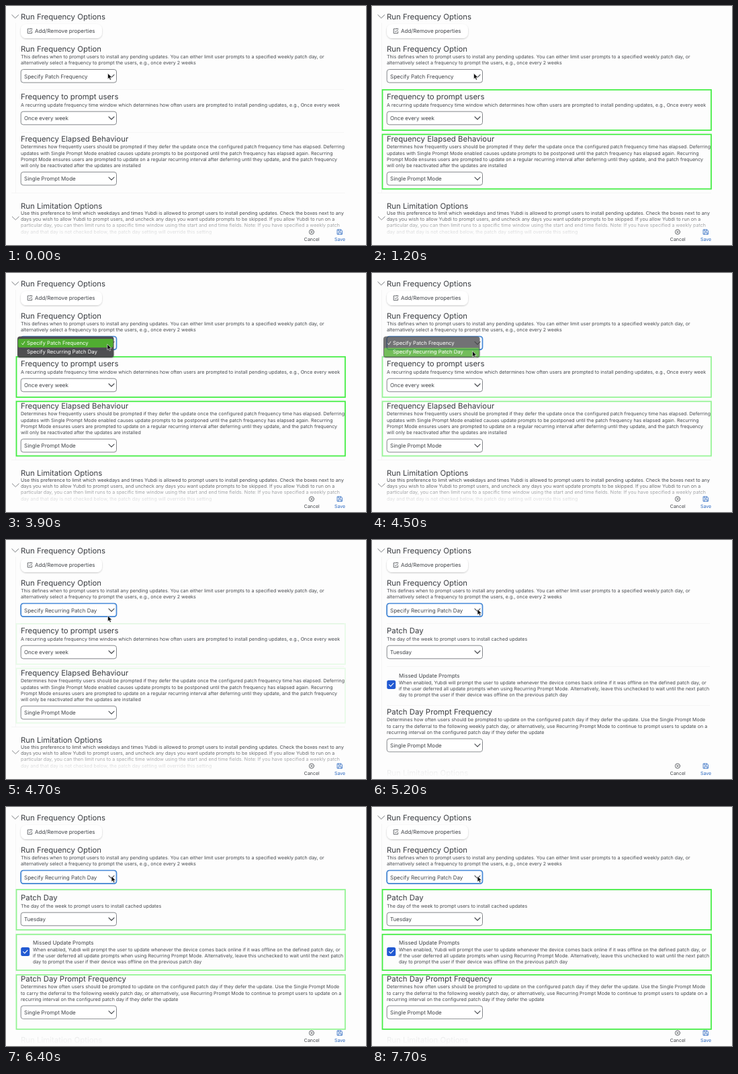
Animation, 536 px wide and 356 px high, one loop 8000 ms. Source, as an HTML page:

```html
<!DOCTYPE html>
<html lang="en">
<head>
<meta charset="utf-8">
<title>Run Frequency Options</title>
<style>
  html, body { margin: 0; width: 536px; height: 356px; overflow: hidden; background: #fdfdfd; }
  svg { display: block; }
  text { font-family: Inter, "Open Sans", sans-serif; fill: #414449; text-rendering: geometricPrecision; white-space: pre; }
  .head { font-size: 11.42px; fill: #3a3d42; }
  .body { font-size: 7.1px; fill: #45484d; }
  .item { font-size: 8px; }
  .menu { font-size: 7.75px; fill: #fff; }
  .foot { font-size: 7px; text-anchor: middle; }
  .line, .fine { fill: none; stroke: #45484d; stroke-width: 1.1; stroke-linecap: round; stroke-linejoin: round; }
  .fine { stroke-width: .8; }
  .fold { fill: none; stroke: #74777b; stroke-width: 1; }
  .rule { fill: none; stroke: #f5f5f5; }
  .box { fill: none; stroke: #46ee46; stroke-width: 1.8; }
  .save text { fill: #2a68c0; }
  .save path { stroke: #2a68c0; }
</style>
</head>
<body>
<svg id="stage" width="536" height="356" viewBox="0 0 536 356">
  <defs>
    <linearGradient id="fade" x1="0" y1="0" x2="0" y2="1">
      <stop offset="0" stop-color="#fdfdfd" stop-opacity="0"/>
      <stop offset=".3" stop-color="#fdfdfd" stop-opacity=".45"/>
      <stop offset=".55" stop-color="#fdfdfd" stop-opacity=".82"/>
      <stop offset=".8" stop-color="#fdfdfd" stop-opacity=".94"/>
      <stop offset="1" stop-color="#fdfdfd"/>
    </linearGradient>
    <filter id="shadow" x="-10%" y="-30%" width="120%" height="170%">
      <feDropShadow dx="0" dy="1" stdDeviation="1.3" flood-opacity=".22"/>
    </filter>
  </defs>
</svg>
<script>
const stage = document.getElementById("stage");
const LEFT = 22, LEADING = 9.3;

const text = (cls, x, y, s) => `<text class="${cls}" x="${x}" y="${y}">${s}</text>`;
const head = (y, s) => text("head", LEFT, y, s);
const body = (x, y, lines) => lines.map((s, i) => text("body", x, y + i * LEADING, s)).join("");
const path = (d, cls = "line", extra = "") => `<path class="${cls}" d="${d}" ${extra}/>`;
const rect = (x, y, w, h, attrs) => `<rect x="${x}" y="${y}" width="${w}" height="${h}" ${attrs}/>`;
const group = (id, content) => `<g id="${id}">${content}</g>`;
const rule = y => path(`M${LEFT} ${y}H503`, "rule");
const box = (top, bottom) => rect(15.5, top, 489.5, bottom - top, 'class="box"');
const fold = (x, y) => path(`M${x} ${y}l5.2 5 5.2-5`, "fold");
const select = (y, label) =>
  rect(22.2, y, 142.3, 19.6, 'rx="3.5" fill="#fff" stroke="#85888c"') +
  path(`M153 ${y + 7.8}l4 4 4-4`) + (label ? text("item", 27, y + 13, label) : "");

const limits = y => fold(9, y + 11.8) + head(y, "Run Limitation Options") + body(LEFT, y + 9, [
  "Use this preference to limit which weekdays and times Yubdi is allowed to prompt users to install pending updates. Check the boxes next to any",
  "days you wish to allow Yubdi to prompt users, and uncheck any days you want update prompts to be skipped. If you allow Yubdi to run on a",
  "particular day, you can then limit runs to a specific time window using the start and end time fields. Note: If you have specified a weekly patch",
  "day and that day is not checked below, the patch day setting will override this setting"
]);

const common =
  path("M14.5 25V278", "rule") +
  fold(8.5, 13) + head(19.8, "Run Frequency Options") +
  rect(22, 27, 121, 21, 'rx="8" fill="#fff" filter="url(#shadow)"') +
  path("M36.5 34H32.2V40.6H38.6V38M34 37.2l1.4 1.4 3.4-3.6M36.6 33.7h2.2", "fine") +
  text("item", 43, 40.1, "Add/Remove properties") +
  head(67.6, "Run Frequency Option") +
  body(LEFT, 78, [
    "This defines when to prompt users to install any pending updates. You can either limit user prompts to a specified weekly patch day, or",
    "alternatively select a frequency to prompt the users, e.g., once every 2 weeks"
  ]) +
  select(94.5, "") +
  rect(22.2, 94.5, 142.3, 19.6, 'id="focus" rx="3.5" fill="none" stroke="#4488d8" stroke-width="1.7"') +
  '<text id="choice" class="item" x="27" y="107.5"></text>';

const frequency =
  rule(124.5) + head(139.4, "Frequency to prompt users") +
  body(LEFT, 149.5, ["A recurring update frequency time window which determines how often users are prompted to install pending updates, e.g., Once every week"]) +
  select(157.2, "Once every week") +
  rule(188.5) + head(202.2, "Frequency Elapsed Behaviour") +
  body(LEFT, 212.3, [
    "Determines how frequently users should be prompted if they defer the update once the configured patch frequency time has elapsed. Deferring",
    "updates with Single Prompt Mode enabled causes update prompts to be postponed until the patch frequency has elapsed again. Recurring",
    "Prompt Mode ensures users are prompted to update on a regular recurring interval after deferring until they update, and the patch frequency",
    "will only be reactivated after the updates are installed"
  ]) +
  select(247.3, "Single Prompt Mode") +
  path("M8 278.5H505", "rule") + limits(301.8);

const patchDay =
  rule(124.5) + head(139.4, "Patch Day") +
  body(LEFT, 149.5, ["The day of the week to prompt users to install cached updates"]) +
  select(157.2, "Tuesday") +
  rule(188.5) + rect(22.2, 209, 13, 13, 'rx="2.5" fill="#2159d2"') +
  path("M25.6 215.6l2.2 2.2 4.2-4.5", "line", 'style="stroke:#fff"') +
  text("item", 40, 204.7, "Missed Update Prompts") +
  body(40, 214.5, [
    "When enabled, Yubdi will prompt the user to update whenever the device comes back online if it was offline on the defined patch day, or",
    "if the user deferred all update prompts when using Recurring Prompt Mode. Alternatively, leave this unchecked to wait until the next patch",
    "day to prompt the user if their device was offline on the previous patch day"
  ]) +
  rule(246.5) + head(260.3, "Patch Day Prompt Frequency") +
  body(LEFT, 270.3, [
    "Determines how often users should be prompted to update on the configured patch day if they defer the update. Use the Single Prompt Mode",
    "to carry the deferral to the following weekly patch day, or alternatively, use Recurring Prompt Mode to continue to prompt users to update on a",
    "recurring interval on the configured patch day if they defer the update"
  ]) +
  select(296, "Single Prompt Mode") + limits(350.5);

const footer =
  rect(0, 312, 536, 44, 'fill="url(#fade)"') +
  '<circle class="fine" cx="455" cy="336.6" r="3.6"/>' +
  path("M453.7 335.3l2.6 2.6m0-2.6l-2.6 2.6", "fine") +
  text("foot", 455.3, 350.3, "Cancel") +
  '<g class="save">' +
  path("M493.5 333.1h5.3l1.7 1.7v5.3h-7zM495 333.1v2.3h3.4v-2.3M495 340.1v-2.7h4v2.7", "fine") +
  text("foot", 497, 350.3, "Save") + "</g>";

const menu =
  rect(17, 94.5, 143.5, 31.5, 'rx="4" fill="#48494b" fill-opacity=".95" filter="url(#shadow)"') +
  rect(18, 0, 141.5, 13, 'id="hover" rx="2" fill="#50ad31"') +
  path("M23.5 104.8l1.5 2 2.8-4.6", "fine", 'style="stroke:#fff"') +
  text("menu", 31, 107.2, "Specify Patch Frequency") +
  text("menu", 31, 120.4, "Specify Recurring Patch Day");

stage.insertAdjacentHTML("beforeend",
  common + group("frequency", frequency) + group("patchDay", patchDay) + footer +
  group("boxesA", box(124.8, 185) + box(191.3, 272.5)) +
  group("boxesB", box(123, 183) + box(189.8, 243.2) + box(250, 331)) +
  group("menu", menu) +
  path("M0 0V8.6l2-1.8 1.4 3.2 1.6-.7L3.6 6.2H6.3z", "", 'id="cursor" fill="#111" stroke="#fff" stroke-width=".6"'));

const el = id => document.getElementById(id);
const show = (id, on) => el(id).style.display = on ? "" : "none";
const alpha = (id, a) => el(id).style.opacity = a;
const ramp = (t, from, to) => Math.min(1, Math.max(0, (t - from) / (to - from)));
const ease = p => p * p * (3 - 2 * p);

function draw(t) {
  const swapped = t >= 4800;
  const toItem = ease(ramp(t, 3700, 4200)), toSelect = ease(ramp(t, 4600, 4900));
  show("frequency", !swapped);
  show("patchDay", swapped);
  show("menu", t >= 3000);
  show("focus", t >= 3300);
  // The closing menu fades over an empty field, then the new choice appears.
  el("choice").textContent = t < 3000 ? "Specify Patch Frequency" : t < 4600 ? "" : "Specify Recurring Patch Day";
  el("hover").setAttribute("y", toItem < .5 ? 98 : 111.4);
  alpha("menu", 1 - ramp(t, 4450, 4700));
  alpha("boxesA", ramp(t, 950, 1200) * (1 - ramp(t, 4300, 4750)));
  alpha("boxesB", ramp(t, 6200, 6550));
  const x = 151.5 - 2 * toItem + 7.5 * toSelect;
  const y = 100.3 + 16 * toItem - 13.3 * toSelect;
  el("cursor").setAttribute("transform", `translate(${x} ${y})`);
}

function tick() {
  draw(performance.now() % 8000);
  requestAnimationFrame(tick);
}
tick();
</script>
</body>
</html>
```
